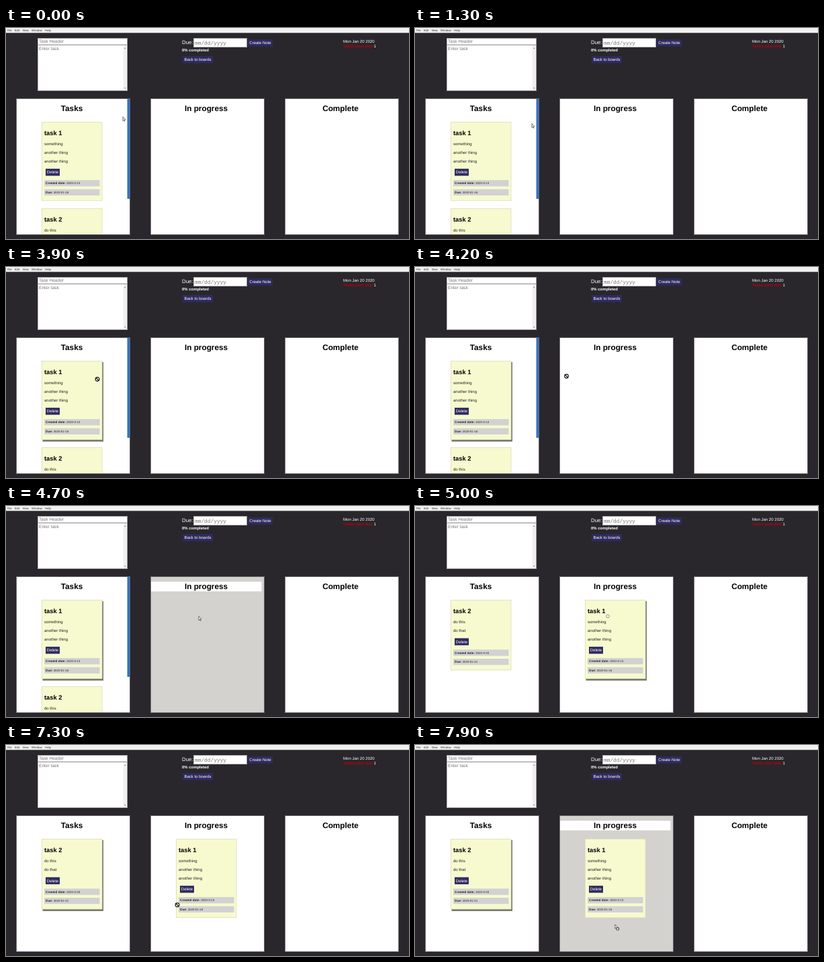
These frames come from a looping animation (600 by 315 pixels, 8 s). An HTML page with a canvas:

```html
<!DOCTYPE html>
<html lang="en">
<head>
<meta charset="utf-8">
<title>Task board</title>
<style>
  html, body { margin: 0; width: 100%; height: 100%; overflow: hidden; background: #29272c; }
  canvas { display: block; }
</style>
</head>
<body>
<canvas id="stage" width="600" height="315"></canvas>
<script>
const ctx = document.getElementById('stage').getContext('2d');
ctx.textRendering = 'geometricPrecision';

const LOOP = 8000, STEP = 100;
const SANS = '"Liberation Sans", Arial, sans-serif';
const MONO = '"Liberation Mono", monospace';
const DARK = '#29272c', GREY = '#777';
const COLUMN = { x: 15, y: 105, w: 170, h: 204, pitch: 200 };
const CARD = { x: 53, y: 140, w: 90.5, gap: 11, line: 12.7 };

const task1 = { title: 'task 1', items: ['something', 'another thing', 'another thing'], created: '2020-0-13', due: '2020-01-16' };
const task2 = { title: 'task 2', items: ['do this', 'do that'], created: '2020-0-20', due: '2020-01-21' };

// Pointer stops
const stops = [
  { t: 0, x: 174, y: 132.5 },
  { t: 2500, x: 174, y: 152 },
  { t: 3000, x: 106, y: 167 },
  { t: 3700, x: 106, y: 167 },
  { t: 3900, x: 136, y: 167.5 },
  { t: 4200, x: 225.5, y: 163 },
  { t: 4700, x: 287, y: 164.5 },
  { t: 5700, x: 287, y: 164.5 },
  { t: 6100, x: 93, y: 158 },
  { t: 6700, x: 105, y: 163 },
  { t: 7500, x: 305, y: 264 },
  { t: 7900, x: 298, y: 268 }
];

function pointerAt(t) {
  const i = stops.findIndex(s => s.t >= t);
  const b = stops[i], a = stops[i - 1] || b;
  const k = (t - a.t) / (b.t - a.t || 1);
  return [a.x + (b.x - a.x) * k, a.y + (b.y - a.y) * k];
}

function box(x, y, w, h, fill, border) {
  if (border) {
    ctx.fillStyle = border;
    ctx.fillRect(x, y, w, h);
  }
  const inset = border ? 1 : 0;
  ctx.fillStyle = fill;
  ctx.fillRect(x + inset, y + inset, w - 2 * inset, h - 2 * inset);
}

function text(str, x, y, size, { color = '#222', weight = 'normal', family = SANS, align = 'left' } = {}) {
  ctx.font = `${weight} ${size}px ${family}`;
  ctx.textAlign = align;
  ctx.fillStyle = color;
  ctx.fillText(str, x, y);
  return ctx.measureText(str).width;
}

function button(label, x, y, w) {
  box(x, y, w, 10.5, '#2f2b60');
  text(label, x + w / 2, y + 7.2, 6, { color: '#fff', align: 'center' });
}

function header() {
  box(0, 0, 600, 7.3, '#f0f0f0');
  let x = 2;
  for (const label of ['File', 'Edit', 'View', 'Window', 'Help'])
    x += text(label, x, 5.3, 4.2, { family: '"Open Sans", sans-serif' }) + 4.3;

  box(47, 15, 134, 10.5, '#fff', '#aaa');
  box(47, 25, 134, 69, '#fff', '#aaa');
  box(174.5, 26, 5.5, 67, '#f0f0f0');
  text('▴', 177.3, 30.5, 4, { color: GREY, align: 'center' });
  text('▾', 177.3, 91, 4, { color: GREY, align: 'center' });
  text('Task Header', 49, 22.2, 6.6, { color: GREY });
  text('Enter task', 49, 32.6, 6.6, { color: GREY });

  const white = { color: '#fff' };
  text('Due:', 262, 24.3, 7.8, white);
  box(279, 15, 80, 14, '#fff', '#aaa');
  text('mm/dd/yyyy', 281, 24.8, 7.85, { color: GREY, family: MONO });
  button('Create Note', 360, 17, 37);
  text('0% completed', 262, 35, 5.95, { color: '#fff', weight: 'bold' });
  button('Back to boards', 263, 42, 45);

  text('Mon Jan 20 2020', 502, 22.2, 6.05, white);
  const w = text('Tasks past due:', 502, 29.2, 6, { color: '#b8000c', weight: 'bold' });
  text('1', 502.5 + w, 29.2, 6, white);
}

const cardHeight = task => 80 + task.items.length * CARD.line;

function strip(label, value, x, y) {
  box(x, y, 82.5, 9.3, '#d2d2d2');
  const w = text(label, x + 2, y + 6.3, 4.7, { weight: 'bold' });
  text(' ' + value, x + 2 + w, y + 6.3, 4.4);
}

function card(task, x, y, raised) {
  const h = cardHeight(task), left = x + 4;
  if (raised) box(x + 1.5, y + 2, CARD.w, h + 0.5, '#74756c');
  box(x, y, CARD.w, h, '#f7facf', '#e0e3c2');
  text(task.title, left, y + 20.2, 9.4, { color: '#000', weight: 'bold' });
  task.items.forEach((item, i) => text(item, left, y + 35.2 + i * CARD.line, 6));
  const below = y + 32 + task.items.length * CARD.line;
  button('Delete', x + 6, below, 21);
  strip('Created date:', task.created, left, below + 17);
  strip('Due:', task.due, left, below + 30.6);
}

function column(title, index, tasks, active, raisedTask) {
  const { y, w, h } = COLUMN, x = COLUMN.x + index * COLUMN.pitch;
  box(x, y, w, h, active ? '#d3d2ce' : '#fff', '#6c6b6e');
  if (active) box(x + 1, y + 8, w - 5.5, 14.5, '#fff');
  text(title, x + 83, y + 19.2, 11.8, { color: '#000', weight: 'bold', align: 'center' });
  ctx.save();
  ctx.beginPath();
  ctx.rect(x, y, w, h - 1);
  ctx.clip();
  let top = CARD.y;
  for (const task of tasks) {
    card(task, CARD.x + index * COLUMN.pitch, top, task === raisedTask);
    top += cardHeight(task) + CARD.gap;
  }
  ctx.restore();
  if (tasks.length > 1) box(x + 165.5, y + 1, 4, 149, '#3a70bb');
}

function outline(width, color) {
  ctx.fillStyle = '#fff';
  ctx.strokeStyle = color;
  ctx.lineWidth = width;
  ctx.fill();
  ctx.stroke();
}

const cursors = {
  arrow(x, y) {
    ctx.beginPath();
    ctx.moveTo(x, y);
    ctx.lineTo(x, y + 6);
    ctx.lineTo(x + 1.5, y + 4.8);
    ctx.lineTo(x + 2.7, y + 7);
    ctx.lineTo(x + 2.3, y + 4.6);
    ctx.lineTo(x + 4, y + 4.4);
    ctx.closePath();
    outline(0.7, '#333');
  },
  copy(x, y) {
    cursors.arrow(x, y);
    box(x + 1.5, y + 4.5, 4.5, 4, '#fff', '#444');
  },
  hand(x, y) {
    ctx.beginPath();
    ctx.ellipse(x, y, 2.4, 2.3, 0, 0, Math.PI * 2);
    outline(0.6, '#444');
  },
  noDrop(x, y) {
    ctx.beginPath();
    ctx.arc(x, y, 2.9, 0, Math.PI * 2);
    ctx.moveTo(x - 2, y - 2);
    ctx.lineTo(x + 2, y + 2);
    outline(1.1, '#111');
  }
};

function draw(t) {
  const between = (from, to) => t >= from && t < to;
  const [x, y] = pointerAt(t);
  const lists = t < 4800 ? [[task1, task2], [], []] : [[task2], [task1], []];
  const dragged = between(3800, 4800) ? task1 : t >= 6800 ? task2 : null;
  const target = between(4000, 4100) ? 0 : between(4300, 4800) || t >= 7600 ? 1 : -1;
  const hovered = lists.map(list => list[0]).find((task, i) => {
    const dx = x - CARD.x - i * COLUMN.pitch, dy = y - CARD.y;
    return task && dx > 0 && dx < CARD.w && dy > 0 && dy < cardHeight(task);
  });

  box(0, 0, 600, 315, DARK);
  header();
  ['Tasks', 'In progress', 'Complete'].forEach((title, i) =>
    column(title, i, lists[i], i === target, dragged || hovered));

  const dragCursor = target < 0 ? 'noDrop' : dragged === task2 ? 'copy' : 'arrow';
  cursors[dragged ? dragCursor : hovered ? 'hand' : 'arrow'](x, y);
}

function frame() {
  draw(Math.floor(performance.now() % LOOP / STEP) * STEP);
  requestAnimationFrame(frame);
}
frame();
</script>
</body>
</html>
```
